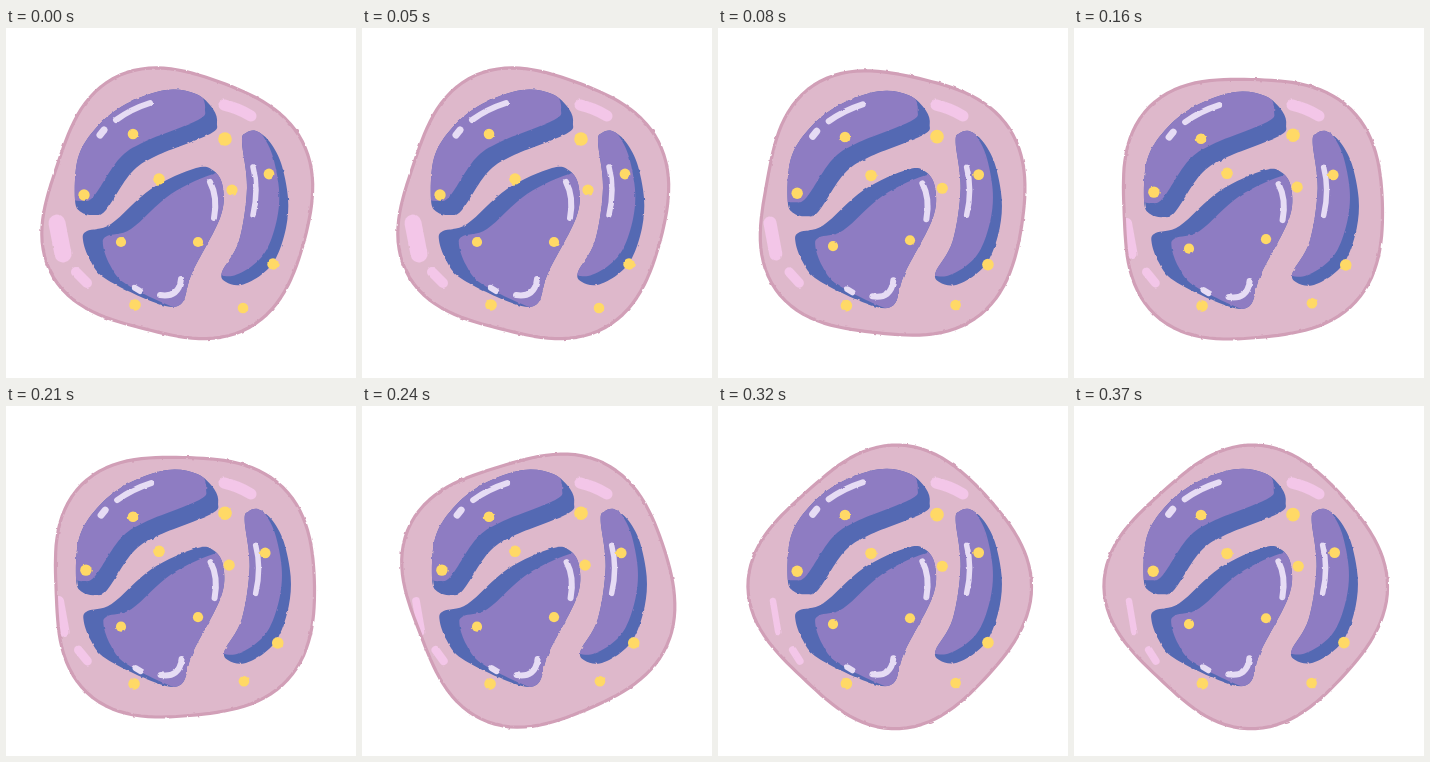
An HTML page for the animation above (400 ms loop, 350x350 px).

```html
<!DOCTYPE html>
<html lang="en">
<head>
<meta charset="utf-8">
<title>Wobbling cell</title>
<style>
  html, body { margin: 0; width: 100%; height: 100%; overflow: hidden; background: #fff; }
  svg { display: block; width: 350px; height: 350px; }
  .pose { opacity: 0; animation: show .4s step-end infinite; animation-delay: calc(var(--i) * 80ms - 400ms); }
  @keyframes show { 0% { opacity: 1; } 20%, 100% { opacity: 0; } }
  .cell { fill: #deb8cb; }
  .dark { fill: #5469b3; }
  .light { fill: #8e7cc2; }
  .line { fill: none; stroke-linecap: round; stroke-linejoin: round; }
  .rim { stroke: #d19fb7; }
  .shine { stroke: #e6dcf4; }
  .pink { stroke: #f3c6e8; }
  .dot { fill: #ffd966; }
</style>
</head>
<body>
<svg id="stage" viewBox="0 0 350 350">
  <filter id="rough" filterUnits="userSpaceOnUse" x="0" y="0" width="350" height="350" color-interpolation-filters="sRGB">
    <feTurbulence type="fractalNoise" baseFrequency=".2" numOctaves="1" seed="4"/>
    <feDisplacementMap in="SourceGraphic" scale="2.5" xChannelSelector="R" yChannelSelector="G"/>
  </filter>
</svg>
<script>
const POSES = 5;
const TAU = 2 * Math.PI;
const { sin, cos, PI } = Math;

// The light face is the body moved by `face` and clipped to itself; `sway` is the farthest drift
const lobes = [
  {
    body: '69,172 72,130 90,100 120,76 160,62 190,66 207,81 211,95 204,106 150,128 125,145 100,182 88,187 75,184',
    face: [-12, -14],
    sway: [1.2, 2.2],
    shines: [['M110 92Q125 81 144 75', 6], ['M94 107L98 102', 7]]
  },
  {
    body: '77,212 81,203 105,196 145,161 190,140 208,143 217,160 214,190 186,245 175,276 150,275 100,251 84,232',
    face: [20, 5],
    sway: [.6, 2.2],
    shines: [['M204 154Q212 169 208 190', 6], ['M154 267Q173 270 175 251', 6], ['M129 260L134 263', 6]]
  },
  {
    body: '236,114 240,105 250,103 263,113 275,135 282,170 280,200 270,230 255,247 235,257 220,254 216,244 233,213 241,160',
    face: [-9, -9],
    sway: [2.8, .4],
    shines: [['M247 139Q253 161 247 187', 5.5]]
  }
];

// Home x, y, farthest drift x, y, radius
const dots = [
  [127, 106, 0, 5, 5.3], [78, 167, 2, -3, 5.7], [153, 151, 0, -6, 5.8], [219, 111, 0, -4, 6.8],
  [226, 162, -3, -3, 5.6], [263, 146, -4, 1, 5.4], [115, 214, 0, 7, 5.1], [192, 214, 0, -3, 5.1],
  [129, 277, -1, 1, 5.8], [267, 236, 5, 1, 5.8], [237, 280, 1, -5, 5.3]
];

// Smooth closed curve through the points
function loop(text) {
  const pts = text.split(' ').map(p => p.split(',').map(Number));
  const n = pts.length, at = i => pts[(i + n) % n];
  const lean = (a, b, c) => [0, 1].map(k => a[k] + (c[k] - b[k]) / 6);
  return 'M' + pts[0] + pts.map((p, i) => {
    const q = at(i + 1);
    return 'C' + [lean(p, at(i - 1), q), lean(q, at(i + 2), p), q].join(' ');
  }).join('') + 'Z';
}

// Ripple with k crests that rolls back by one crest per loop, slow at first
function ripple(k, size, start, angle, t) {
  const crest = (start + 18 * sin(PI * t)) / 360 * TAU - TAU * t / k;
  return size * cos(k * (angle - crest));
}

// Two ripples around a centre that circles slightly
function membrane(t) {
  const cx = 174.8 - 2.8 * cos(TAU * t);
  const cy = 179.6 - 3 * cos(TAU * t - .7);
  const steps = 120;
  return 'M' + Array.from({ length: steps }, (_, i) => {
    const a = i / steps * TAU;
    const r = 135.5 + ripple(4, 6.3, 62, a, t) + ripple(3, 2.2, 27, a, t);
    return [(cx + r * cos(a)).toFixed(1), (cy + r * sin(a)).toFixed(1)];
  }).join('L') + 'Z';
}

function add(parent, tag, attrs) {
  const el = document.createElementNS('http://www.w3.org/2000/svg', tag);
  for (const k in attrs) el.setAttribute(k, attrs[k]);
  return parent.appendChild(el);
}

const line = (parent, kind, d, width) =>
  add(parent, 'path', { class: 'line ' + kind, d, 'stroke-width': width });

function clip(id, d) {
  add(add(stage, 'clipPath', { id }), 'path', { d });
  return `url(#${id})`;
}

const stage = document.getElementById('stage');

lobes.forEach((lobe, n) => {
  lobe.path = loop(lobe.body);
  lobe.clip = clip('lobe' + n, lobe.path);
});

for (let i = 0; i < POSES; i++) {
  const t = i / POSES;
  const swing = sin(PI * t);
  const pose = add(stage, 'g', { class: 'pose', style: `--i:${i}`, filter: 'url(#rough)' });

  const skin = membrane(t);
  add(pose, 'path', { class: 'cell', d: skin });
  const glow = add(pose, 'g', { 'clip-path': clip('skin' + i, skin) });
  line(glow, 'pink', 'M218 77Q232 80 245 88', 11);
  line(glow, 'pink', `M${51 + 5 * t} 195L${57 + 4 * t} 226`, 6 + 11 * (1 - t) ** 2);
  line(glow, 'pink', `M${70 + 6 * t} 244L${81 + t} 255`, 10 - 3 * t);
  line(pose, 'rim', skin, 3.2);

  for (const { path, clip, face, sway, shines } of lobes) {
    const g = add(pose, 'g', { transform: `translate(${sway.map(s => s * swing)})` });
    add(g, 'path', { class: 'dark', d: path });
    add(add(g, 'g', { 'clip-path': clip }), 'path', { class: 'light', d: path, transform: `translate(${face})` });
    for (const [d, width] of shines) line(g, 'shine', d, width);
  }

  for (const [x, y, dx, dy, r] of dots) {
    add(pose, 'circle', { class: 'dot', cx: x + dx * swing, cy: y + dy * swing, r });
  }
}
</script>
</body>
</html>
```
